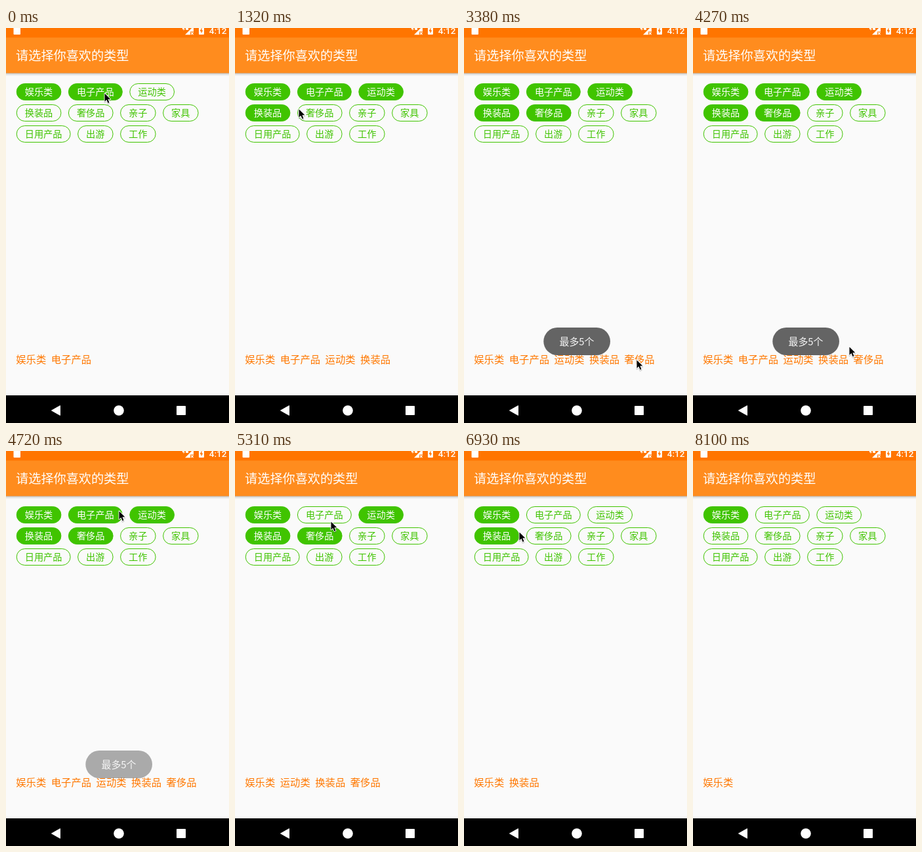
These frames come from a looping animation (340 px wide and 600 px high, 9290 ms). An HTML page:

```html
<!DOCTYPE html>
<html lang="zh-CN">
<head>
<meta charset="utf-8">
<title>选择类型</title>
<style>
  html, body { margin: 0; width: 100%; height: 100%; overflow: hidden; background: #fafafa; }
  svg { display: block; width: 340px; height: 600px; }
  text { font-family: "Noto Sans CJK SC", "Noto Sans CJK", sans-serif; white-space: pre; }
  .clock { font: 500 13.6px Roboto, sans-serif; }
</style>
</head>
<body>
<svg viewBox="0 0 340 600" xmlns="http://www.w3.org/2000/svg">
  <defs>
    <linearGradient id="shade" x1="0" y1="0" x2="0" y2="1">
      <stop offset="0" stop-color="#000" stop-opacity=".3"/>
      <stop offset=".4" stop-color="#000" stop-opacity=".12"/>
      <stop offset="1" stop-color="#000" stop-opacity="0"/>
    </linearGradient>
  </defs>
  <rect width="340" height="600" fill="#fafafa"/>

  <rect y="68" width="340" height="5" fill="url(#shade)"/>
  <rect y="14" width="340" height="54.5" fill="#ff8c1e"/>
  <rect width="340" height="14.5" fill="#ff7500"/>
  <text x="15.1" y="49" font-size="19.15" fill="#fff">请选择你喜欢的类型</text>

  <g fill="#fff">
    <path d="M11.5 0H22V9a1 1 0 0 1-1 1H12.5a1 1 0 0 1-1-1Z"/>
    <path d="M269 0h2.6v1h1v1h-1v1.5h-1.1V2H269ZM274 0h4v3h-3.2L274 2Z"/>
    <path d="M273 10.2 283.2 0H286V5.5H281V10.2Z"/>
    <path d="M282 6.5l3.6 3.6m0-3.6l-3.6 3.6" stroke="#fff" stroke-width="1.1"/>
    <path d="M294 0H302V9a1 1 0 0 1-1 1H295a1 1 0 0 1-1-1Z"/>
    <path d="M298.5 0V3.5H300.3L297.5 8.5V5H295.7L298 0Z" fill="#ff7500"/>
    <text class="clock" x="309.7" y="8.8">4:12</text>
  </g>

  <g id="chips"></g>
  <g id="picked" font-size="15.3" fill="#ff7800"></g>

  <g id="toast">
    <rect x="121.3" y="455" width="101.7" height="42" rx="21" fill="#646464"/>
    <text x="172" y="481.5" font-size="14.9" text-anchor="middle" fill="#f4f4f4">最多5个</text>
  </g>

  <rect y="558" width="340" height="42" fill="#000"/>
  <g fill="#fff">
    <path d="M69.5 581 82.5 573.7V588.3Z" stroke="#fff" stroke-linejoin="round"/>
    <circle cx="172" cy="581" r="7.8"/>
    <rect x="260" y="574" width="14" height="14" rx=".8"/>
  </g>

  <g id="cursor" stroke-linejoin="round">
    <path d="M.5 3V15.2L3.4 12.5 5.5 17.5 7.5 16.7 5.4 11.8H9.3Z" stroke="#000" stroke-width="2" opacity=".16"/>
    <path d="M.5 1.5V13.7L3.4 11 5.5 16 7.5 15.2 5.4 10.3H9.3Z" stroke="#fff" stroke-width="1.8" paint-order="stroke"/>
  </g>
</svg>
<script>
const LOOP = 9290;
const STEP = LOOP / 63;   // the screen refreshes 63 times per loop
const TRAVEL = 590;       // longest time the pointer takes for one move
const GREEN = '#40c400';
const $ = id => document.getElementById(id);

function add(parent, tag, attrs, label = '') {
  const el = document.createElementNS('http://www.w3.org/2000/svg', tag);
  for (const key in attrs) el.setAttribute(key, attrs[key]);
  el.textContent = label;
  parent.append(el);
  return el;
}

// Each tag is followed by the times at which it is toggled.
const rows = [
  [['娱乐类', 0], ['电子产品', 0, 5160], ['运动类', 580, 6480]],
  [['换装品', 1320, 7070], ['奢侈品', 1760, 5600], ['亲子'], ['家具']],
  [['日用产品'], ['出游'], ['工作']]
];

const chips = [];
rows.forEach((row, i) => {
  const y = 84 + 32 * i;
  let x = 15.7;
  for (const [name, ...toggles] of row) {
    const width = 14.2 * name.length + 26.1;
    const pill = add($('chips'), 'rect', {
      x: x + .5, y: y + .5, width: width - 1, height: 25, rx: 12.5, stroke: GREEN
    });
    const label = add($('chips'), 'text', { x: x + 13, y: y + 18.4, 'font-size': 14.2 }, name);
    const line = add($('picked'), 'text', { y: 509 }, name);
    chips.push({ name, toggles, pill, label, line });
    x += width + 10.5;
  }
});

// Pointer stops: arrival time, x, y.
const stops = [
  [0, 150, 98], [590, 210, 97], [1030, 53, 122], [1330, 97, 122], [1620, 110, 122],
  [2500, 141, 158], [3100, 206, 341], [3390, 263, 503], [3980, 250, 554],
  [4720, 172, 90], [5160, 150, 99], [5600, 134, 127], [5900, 164, 102],
  [6040, 213, 102], [7080, 60, 126], [7520, 190, 420], [7960, 240, 564]
];
const POINTER_GONE = 8050;

const clamp = v => Math.min(1, Math.max(0, v));
const smooth = v => v * v * (3 - 2 * v);

function pointerAt(t) {
  const next = stops.findIndex(([time]) => time > t);
  if (next < 0) return stops.at(-1).slice(1);
  const [t0, ...from] = stops[next - 1];
  const [t1, ...to] = stops[next];
  const span = Math.min(TRAVEL, t1 - t0);
  const k = smooth(clamp((t - t1 + span) / span));
  return from.map((v, i) => v + (to[i] - v) * k);
}

function toastAlpha(t) {
  const enter = clamp((t - 2468) / 500);
  const leave = clamp((t - 4376) / 500);
  return 1 - (1 - enter) ** 2 - leave ** 2;
}

function draw(t) {
  let x = 15.3;
  for (const { name, toggles, pill, label, line } of chips) {
    const on = toggles.filter(at => at <= t).length % 2 === 1;
    pill.setAttribute('fill', on ? GREEN : 'none');
    label.setAttribute('fill', on ? '#fff' : GREEN);
    line.setAttribute('visibility', on ? 'visible' : 'hidden');
    if (on) {
      line.setAttribute('x', x);
      x += 15.3 * name.length + 7.6;
    }
  }
  $('toast').setAttribute('opacity', toastAlpha(t));
  $('cursor').setAttribute('visibility', t < POINTER_GONE ? 'visible' : 'hidden');
  $('cursor').setAttribute('transform', `translate(${pointerAt(t).map(Math.round)})`);
}

const start = performance.now();
function tick() {
  const t = (performance.now() - start) % LOOP;
  // Refreshes fall up to 12 ms ahead of the even beat.
  draw(Math.min(62, Math.floor((t + 12) / STEP)) * STEP);
  requestAnimationFrame(tick);
}
tick();
</script>
</body>
</html>
```
